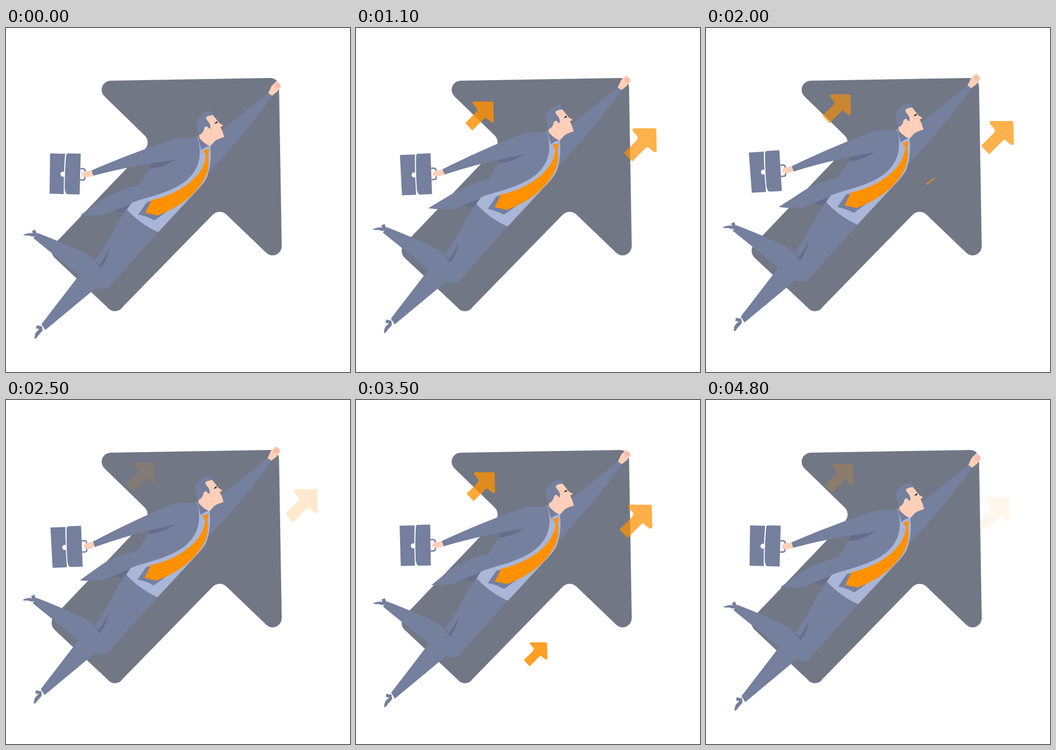
Recreate the animation shown at these times as an HTML page. Size 640 px wide and 640 px high, loop 4.9 s.

```html
<!DOCTYPE html>
<html lang="en">
<head>
<meta charset="utf-8">
<title>Flying businessman</title>
<style>
  html, body { margin: 0; width: 100%; height: 100%; overflow: hidden; background: #fff; }
  svg { display: block; width: 100vw; height: 100vh; }
  .suit { fill: #757f9e; }
  .shade { fill: #646e8b; }
  .shirt { fill: #aab6d7; }
  .skin { fill: #ffcfb9; }
  .fold { fill: #f3bfaa; }
  .orange { fill: #ff9100; }
  .streak { stroke: #ff9100; stroke-width: 1.8; }
</style>
</head>
<body>
<svg viewBox="0 0 640 640">
  <defs>
    <path id="arrow" class="orange" d="M19 0H57Q60 0 60 3L61 41Q60 46 55 44L47 37Q43 33 40 37L15 62L0 46L24 22Q27 17 24 14L17 6Q14 1 19 0Z"/>
  </defs>

  <path fill="#717784" d="M195 98L490 93Q507 93 508 110L513 406A17 17 0 0 1 484 418L410 347A18 18 0 0 0 384 348L217 519A17 17 0 0 1 189 520L91 428A18 18 0 0 1 90 402L258 226A18 18 0 0 0 258 200L184 128A17 17 0 0 1 195 98Z"/>
  <g id="arrows"></g>
  <g id="streaks"></g>

  <g id="man">
    <!-- raised arm -->
    <path class="suit" d="M489 120L404 188Q385 200 374 215L376 270L384 262L436 203Q466 167 495 127Z"/>
    <path class="skin" d="M488 121L494 108L504 98L506 101L510 104L512 109L508 114L504 119L495 126Z"/>
    <path class="fold" d="M499 106L505 102L510 105L509 111L503 113Z"/>

    <!-- legs and shoes -->
    <path class="suit" d="M225 337L283 380L193 481Q186 490 168 483L73 562L66 551L136 460L51 391L58 381Q112 402 145 418Q157 424 165 433Q190 400 208 361Z"/>
    <path class="shade" d="M164 432L174 441Q185 425 192 410Q187 434 176 447Z"/>
    <path class="suit" d="M57 382L54 375L48 378L50 382Q42 380 32 385Q36 387 43 386Q50 390 56 386Z"/>
    <path class="suit" d="M57 553L67 555L68 563Q63 569 60 572Q57 578 53 578Q53 571 56 566L62 560L56 559Z"/>

    <!-- shirt, jacket and tie -->
    <path class="shade" d="M195 340L230 328L219 344Z"/>
    <path class="shirt" d="M355 202L380 219Q384 250 374 278Q368 290 350 308L283 380Q250 365 225 338L240 316L340 255Z"/>
    <path class="suit" d="M358 203L379 219Q370 221 364 227Q359 214 358 203Z"/>
    <path id="jacket" class="suit"/>
    <path class="shade" d="M270 251L317 244Q288 262 266 262Z"/>
    <path class="suit" d="M246 347L262 324L272 321L290 340L303 339L276 358Q262 350 246 347Z"/>
    <path class="orange" d="M367 228L378 225L376 236Q380 264 367 284Q342 326 282 349L259 344L271 320C312 312 368 282 372 237Z"/>

    <!-- head -->
    <path class="skin" d="M371 167Q378 161 385 162L397 177L404 181Q403 183 399 184L403 193L406 203Q395 206 389 210L380 220Q370 216 361 206Q358 202 360 195L365 192Q366 184 372 183Z"/>
    <path class="suit" d="M359 201L353 176Q355 168 365 160Q375 152 383 155L384 162Q374 163 372 166Q372 170 377 175Q381 180 380 187Q378 188 374 183Q369 182 368 190Q365 197 359 199Z"/>
    <path fill="#1d1d28" d="M387 178L393 173L393 177Z"/>

    <!-- trailing arm with case -->
    <g id="arm">
      <path class="suit" d="M328 204Q315 205 300 211Q230 234 159 265L162 275Q232 256 316 245L345 225Z"/>
      <g id="case">
        <path class="suit" d="M-66-37H-38Q-40 0-38.5 38H-65Z"/>
        <circle cx="-41" cy="1" r="4.7" fill="#fff"/>
        <path class="suit" d="M-32-38H-9V38H-32Q-36 37-37 28Q-38 0-36-33Q-36-38-32-38Z"/>
        <path fill="none" stroke="#757f9e" stroke-width="2.6" d="M-9-10H-4Q0-10 0-6V7Q0 11-4 11H-9"/>
      </g>
      <path class="skin" d="M159 265L146 267Q141 268 141 275L148 278Q155 278 162 274Z"/>
    </g>
  </g>
</svg>
<script>
const LOOP = 4900, STEP = 100, CYCLE = 4800, PEAK = 2050, STREAK_TIME = 600;
const { sin, cos, PI, min, max } = Math;
const $ = id => document.getElementById(id);
const wave = p => (1 - cos(2 * PI * p)) / 2;

// Each arrow slides along the diagonal x + y = sum while fading in and out
const A = { size: .87, sum: 340 }, B = { size: 1, sum: 685 }, C = { size: .72, sum: 763 };
const flights = [
  { ...A, start: 200, span: 2400, x: 190, travel: 35.5, power: 1 },
  { ...B, start: 450, span: 2200, x: 489, travel: 32.5, power: 1 },
  { ...C, start: 200, span: 900, x: 297, travel: 20, power: 1 },
  { ...A, start: 2750, span: 2200, x: 182, travel: 39.5, power: 2.2 },
  { ...B, start: 2900, span: 1950, x: 472.5, travel: 32, power: 2.2 },
  { ...C, start: 2900, span: 1400, x: 291, travel: 30, power: 2.2 }
];
const streaks = [
  { x: 358, y: 143, length: 37, start: 1300 },
  { x: 463, y: 108, length: 20, start: 1300 },
  { x: 395, y: 303, length: 30, start: 1550 }
];

function add(parent, tag, attrs) {
  const el = document.createElementNS("http://www.w3.org/2000/svg", tag);
  set(el, attrs);
  return $(parent).appendChild(el);
}
function set(el, attrs) {
  for (const k in attrs) el.setAttribute(k, attrs[k]);
}
for (const f of flights) f.el = add("arrows", "use", { href: "#arrow" });
for (const s of streaks) s.el = add("streaks", "line", { class: "streak" });

function drawMan(t) {
  const turn = 2 * PI * t / CYCLE;
  const rise = t < PEAK ? sin(PI / 2 * t / PEAK) : wave((CYCLE - t) / (CYCLE - PEAK) / 2);
  const arm = -4.7 * wave(3 * t / CYCLE);
  const swing = -1 + 3.9 * cos(3 * turn + .88) - 2.5 * sin(turn) - 2 * sin(2 * turn);
  const flap = 1.2 - 2.6 * sin(turn);

  set($("man"), { transform: `translate(${-1.4 * rise} ${-14 * rise})` });
  set($("arm"), { transform: `rotate(${arm} 310 222)` });
  set($("case"), { transform: `translate(147 272) rotate(${swing - arm})` });
  set($("jacket"), {
    d: `M357 204L322 205L290 222L266 262L247 292Q200 305 180 319L${137 + flap} ${347 + flap}` +
       `Q${158 + flap / 2} ${350 + flap / 2} 182 348L228 329C240 318 300 312 335 284C358 264 366 240 357 204Z`
  });
}

function drawFlight({ el, size, sum, start, span, x, travel, power }, t) {
  const p = min(1, max(0, (t - start) / span));
  const left = x + travel * (1 - (1 - p) ** power);
  set(el, {
    transform: `translate(${left} ${sum - left}) scale(${size})`,
    opacity: .88 * sin(PI * p)
  });
}

function drawStreak({ el, x, y, length, start }, t) {
  const p = (t - start) / STREAK_TIME;
  const head = length * min(1, max(0, p * 2));
  const tail = length * min(1, max(0, p * 2 - 1));
  set(el, { x1: x + tail, y1: y - .8 * tail, x2: x + head, y2: y - .8 * head });
}

function draw(t) {
  drawMan(t);
  for (const f of flights) drawFlight(f, t);
  for (const s of streaks) drawStreak(s, t);
}

const begin = performance.now();
function tick() {
  const t = (performance.now() - begin) % LOOP;
  draw(Math.floor(t / STEP) * STEP);
  requestAnimationFrame(tick);
}
tick();
</script>
</body>
</html>
```
